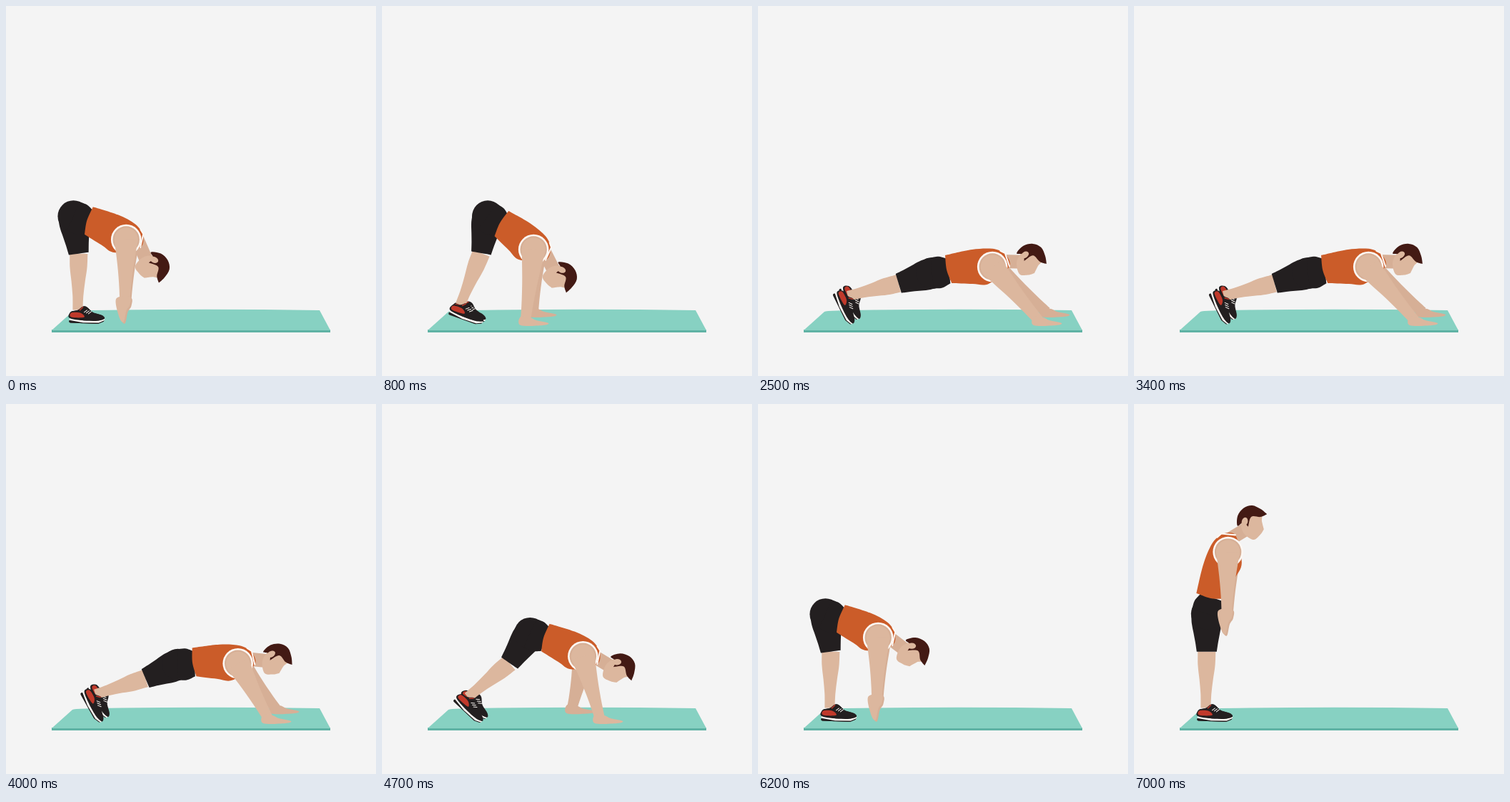
An HTML page with a canvas that plays this animation: 518x518 px, repeating every 7.1 s.

```html
<!DOCTYPE html>
<html lang="en">
<head>
<meta charset="utf-8">
<title>Walkout exercise</title>
<style>
  html, body { margin: 0; height: 100%; overflow: hidden; background: #f4f4f4; }
  canvas { display: block; width: 100vw; height: 100vh; }
</style>
</head>
<body>
<canvas id="stage" width="518" height="518"></canvas>
<script>
const ctx = document.getElementById('stage').getContext('2d');
const LOOP = 7100, STEP = 100, RAD = Math.PI / 180;
const SKIN = '#dcb79e', SKIN_FAR = '#d6af96', RED = '#c0392b';
const ORANGE = '#cb5c29', BLACK = '#231f20', HAIR = '#431a14', WHITE = '#fcf8f4';

// Angles in degrees: shin and thigh from vertical, spine below horizontal, head tilt
const bent = [1, -8, 24, 98], pike = [22, 10, 36, 98], slope = [33, 15, 35, 90];
const plank = [76, 73, -6, 42], look = [1, -8, 24, 76];
const stand = [1, 0, -82, -13], lean = [1, 0, -71, 1];
const KEYS = [
  [0, bent], [800, pike], [1100, slope], [2150, plank], [3650, plank], [5200, slope],
  [5500, pike], [6050, bent], [6200, look], [6750, stand], [6900, stand], [7000, lean], [LOOP, lean]
];

const clamp = (v, low, high) => Math.max(low, Math.min(high, v));
const ease = v => { const u = clamp(v, 0, 1); return u * u * (3 - 2 * u); };
const polar = (x, y, r, degrees) => [x + r * Math.cos(degrees * RAD), y + r * Math.sin(degrees * RAD)];

// Monotone cubic through the key poses
function poseAt(time) {
  const i = clamp(KEYS.findIndex(([t]) => t > time) - 1, 0, KEYS.length - 2);
  const [t0, from] = KEYS[i], [t1, to] = KEYS[i + 1];
  const span = t1 - t0, u = (time - t0) / span, v = 1 - u;
  const slopeOf = (k, j) => KEYS[k] && KEYS[k + 1]
    ? (KEYS[k + 1][1][j] - KEYS[k][1][j]) / (KEYS[k + 1][0] - KEYS[k][0]) : 0;
  const tangent = (k, j) => {
    const a = slopeOf(k - 1, j), b = slopeOf(k, j);
    return a * b > 0 ? 2 * a * b / (a + b) : 0;
  };
  return from.map((start, j) => start + (to[j] - start) * ease(u)
    + span * u * v * (tangent(i, j) * v - tangent(i + 1, j) * u));
}

// Number of hand steps taken: a short move, then a rest, every half second
function steps(time, count) {
  const k = clamp(time / 500, 0, count);
  return Math.floor(k) + ease((k % 1) / .4);
}
const drawBack = time => 26 * ease((time - 3500) / 400);
const nearHand = time => 201 + 64 * steps(time - 1000, 3) - drawBack(time) - 62 * steps(time - 4300, 3);
const farHand = time => 212 + 64 * steps(time - 1250, 3) - drawBack(time) - 56 * steps(time - 4000, 4);
const hanging = time => 1 - ease(time / 600) + ease((time - 5700) / 400);

// Closed smooth outline; a repeated point makes a corner
function blob(color, ...pts) {
  const n = pts.length, at = k => pts[(k + n) % n];
  ctx.beginPath();
  ctx.moveTo(...pts[0]);
  for (let k = 0; k < n; k++) {
    const [a, b, c, d] = [at(k - 1), at(k), at(k + 1), at(k + 2)];
    if (b === c) continue;
    ctx.bezierCurveTo(b[0] + (c[0] - a[0]) / 6, b[1] + (c[1] - a[1]) / 6,
      c[0] - (d[0] - b[0]) / 6, c[1] - (d[1] - b[1]) / 6, ...c);
  }
  ctx.fillStyle = color;
  ctx.fill();
}

// Limb with evenly spaced half-widths
function taper(color, length, ...widths) {
  const side = widths.map((w, k) => [length * k / (widths.length - 1), w]);
  const other = side.map(([x, w]) => [x, -w]).reverse();
  const corners = pts => [pts[0], ...pts, pts[pts.length - 1]];
  blob(color, ...corners(side), ...corners(other));
}

function circle(color, x, y, radius) {
  ctx.beginPath();
  ctx.arc(x, y, radius, 0, 7);
  ctx.fillStyle = color;
  ctx.fill();
}

function line(color, width, ...pts) {
  ctx.beginPath();
  pts.forEach(p => ctx.lineTo(...p));
  ctx.strokeStyle = color;
  ctx.lineWidth = width;
  ctx.stroke();
}

function place([x, y], degrees, draw) {
  ctx.save();
  ctx.translate(x, y);
  ctx.rotate(degrees * RAD);
  draw();
  ctx.restore();
}

function bone(from, to, draw) {
  const dx = to[0] - from[0], dy = to[1] - from[1];
  place(from, Math.atan2(dy, dx) / RAD, () => draw(Math.hypot(dx, dy)));
}

function mat() {
  ctx.fillStyle = '#5fb2a4';
  ctx.fillRect(64, 453, 390, 4);
  ctx.beginPath();
  ctx.moveTo(64, 454);
  ctx.lineTo(93, 428);
  ctx.quadraticCurveTo(96, 426, 160, 425.5);
  ctx.quadraticCurveTo(300, 424, 439, 426);
  ctx.lineTo(454, 454);
  ctx.fillStyle = '#87d1c2';
  ctx.fill();
}

function shoe() {
  line(BLACK, 4, [-10, 16], [28, 17], [35, 14]);
  line(WHITE, 3, [-10, 13], [8, 16], [29, 16], [36, 13]);
  blob(BLACK, [-10, 3], [0, 0], [7, -5], [13, -4], [21, 3], [34, 7], [37, 12], [22, 15], [-10, 12]);
  blob(RED, [-9, 4], [4, 4], [9, 10], [-9, 10]);
  line(RED, 1.5, [3, 0], [7, -4]);
  for (let k = 0; k < 3; k++) line(WHITE, 1, [9 + k * 3, 3 + k], [13 + k * 3, k]);
}

function torso(length) {
  const waist = [20, -23], belly = [25, 17], nape = [101, -17], chest = [105, 2];
  ctx.scale(length / 82, 1);
  blob(ORANGE, waist, waist, [57, -27], [85, -25], nape, nape, chest, [75, 23], [53, 21], belly, belly, [20, -2]);
  line(WHITE, 2, [95, -21], nape, chest);
}

function head() {
  const nose = [17, 9], fringe = [21, -12], sideburn = [-5, 6];
  blob(SKIN, [-13, -10], [12, -13], [14, -2], nose, nose, [12, 17], [2, 24], [-13, 12]);
  blob(HAIR, [-20, 5], [-20, -9], [-12, -20], [0, -24], [12, -19], fringe, fringe,
    [12, -8], [-1, -8], sideburn, sideburn, [-12, 0]);
  place([-10, -1], 15, () => { ctx.scale(.7, 1); circle(SKIN, 0, 0, 6); });
}

// A wrist lifts slightly as it travels over the mat, or hangs below the shoulder
function arm(color, [sx, sy], track, ground, time) {
  const hang = hanging(time), mix = (a, b) => a + (b - a) * hang;
  const lift = Math.min(7, Math.abs(track(time + 40) - track(time - 40)) * .3);
  const wrist = [mix(track(time), sx - 2), mix(ground - lift, sy + 87)];
  circle(color, sx, sy, 16.5);
  bone([sx, sy], wrist, length => taper(color, length, 16.5, 14, 11.5, 9.5, 8, 7));
  place(wrist, hang * 80, () => {
    ctx.scale(1 - .14 * hang, 1 + .6 * hang);
    blob(color, [-7, -5], [6, -4], [15, 0], [32, 4], [24, 7], [-7, 7]);
  });
}

function render(time) {
  const [shin, thigh, spine, tilt] = poseAt(time);
  const raise = Math.sin(shin * .95 * RAD), leg = 1 - .08 * raise * raise;
  const ankle = [100 + 27 * raise, 426 - 21 * raise];
  const knee = polar(...ankle, 79 * leg, shin - 90);
  const hip = polar(...knee, 53 * leg, thigh - 90);
  const shoulder = polar(...hip, 84 - 8 * Math.sin(spine * RAD), spine);
  const skull = polar(...shoulder, 53, tilt - 52);

  ctx.fillStyle = '#f4f4f4';
  ctx.fillRect(0, 0, 518, 518);
  ctx.lineCap = ctx.lineJoin = 'round';
  mat();

  arm(SKIN_FAR, [shoulder[0] + 2, shoulder[1] + 2], farHand, 428, time);
  place([ankle[0] + 9 * raise, ankle[1] - 7 * raise], shin * .82, shoe);
  bone(knee, ankle, length => taper(SKIN, length, 12.5, 12, 9.5, 7.5, 7));
  place(ankle, shin * .82, shoe);
  bone(hip, knee, length => taper(BLACK, length, 21.5, 21, 18.5, 16, 14));
  circle(BLACK, ...hip, 22);
  bone(hip, shoulder, () => taper(BLACK, 24, 21.5, 22, 17));

  line(SKIN_FAR, 19, polar(...shoulder, 16, spine - 22), polar(...skull, 9, tilt + 122));
  place(skull, tilt, head);
  bone(hip, shoulder, torso);
  circle(WHITE, ...shoulder, 21.3);
  circle(SKIN_FAR, ...shoulder, 18.7);
  arm(SKIN, shoulder, nearHand, 440, time);
}

const start = performance.now();
function tick() {
  const time = (performance.now() - start) % LOOP;
  render(Math.floor(time / STEP) * STEP);
  requestAnimationFrame(tick);
}
tick();
</script>
</body>
</html>
```
